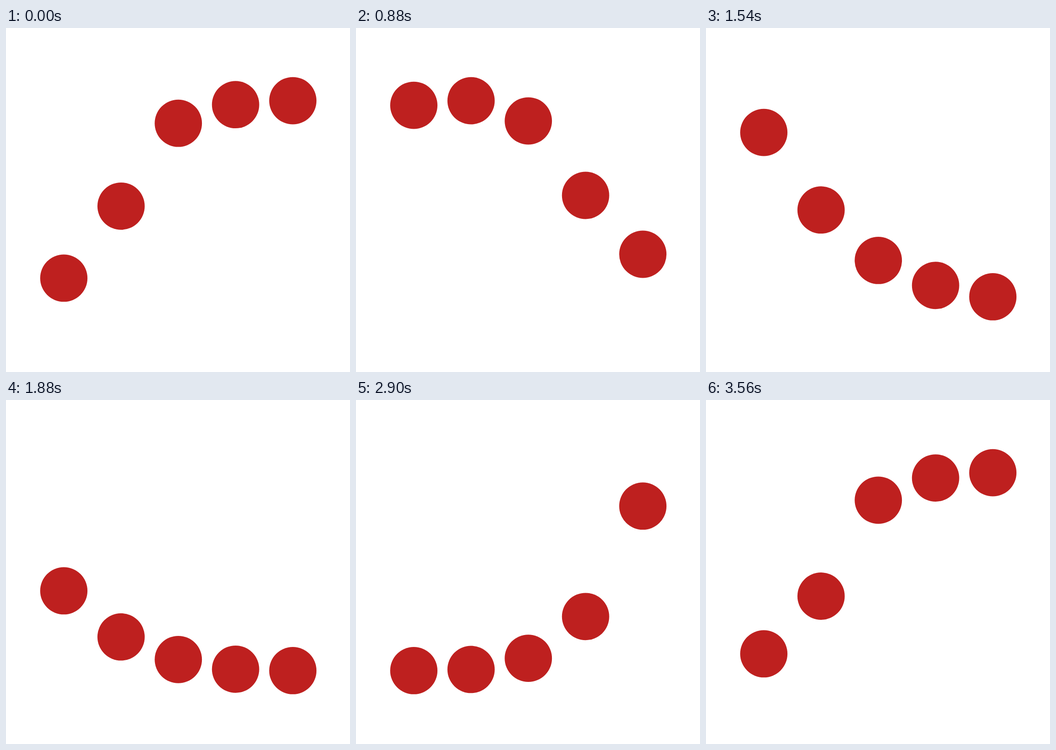
These frames come from a looping animation (748 by 748 pixels, 3.58 s). An HTML page:

```html
<!DOCTYPE html>
<html>
<head>
<meta charset="utf-8">
<title>Bouncing dots</title>
<style>
  html, body { margin: 0; width: 100%; height: 100%; overflow: hidden; background: #fff; }
  svg { display: block; width: 748px; height: 748px; fill: #be201f; }
</style>
</head>
<body>
<svg viewBox="0 0 748 748"></svg>
<script>
const LOOP = 3580, STEP = 20, RISE = 1800, PERIOD = 3600;
const TOP = 158.1, BOTTOM = 589.2;

// Cubic bezier easing with control points (x1, 0) and (x2, 1)
const ease = (x1, x2) => x => {
  let lo = 0, hi = 1, s = 0.5;
  for (let i = 0; i < 24; i++) {
    s = (lo + hi) / 2;
    const r = 1 - s;
    if (3 * x1 * s * r * r + 3 * x2 * s * s * r + s ** 3 < x) lo = s;
    else hi = s;
  }
  return s * s * (3 - 2 * s);
};
const fallEase = ease(0.333, 0.219);
const riseEase = ease(0.786, 0.233);

const svg = document.querySelector('svg');
const dots = [0, 1, 2, 3, 4].map(i => {
  const el = document.createElementNS(svg.namespaceURI, 'circle');
  el.setAttribute('cx', 125.7 + 124.5 * i);
  el.setAttribute('r', 51.4);
  svg.append(el);
  // The last dot falls slightly faster, so it closes the loop at the top
  return { el, start: 1200 - 300 * i, fall: i === 4 ? 1780 : 1800 };
});

function drop({ start, fall }, t) {
  const phase = (t - start + PERIOD) % PERIOD;
  return phase < fall
    ? fallEase(phase / fall)
    : 1 - riseEase(Math.min(1, (phase - fall) / RISE));
}

function draw() {
  const t = Math.floor(performance.now() % LOOP / STEP) * STEP;
  for (const dot of dots)
    dot.el.setAttribute('cy', TOP + (BOTTOM - TOP) * drop(dot, t));
  requestAnimationFrame(draw);
}
draw();
</script>
</body>
</html>
```
